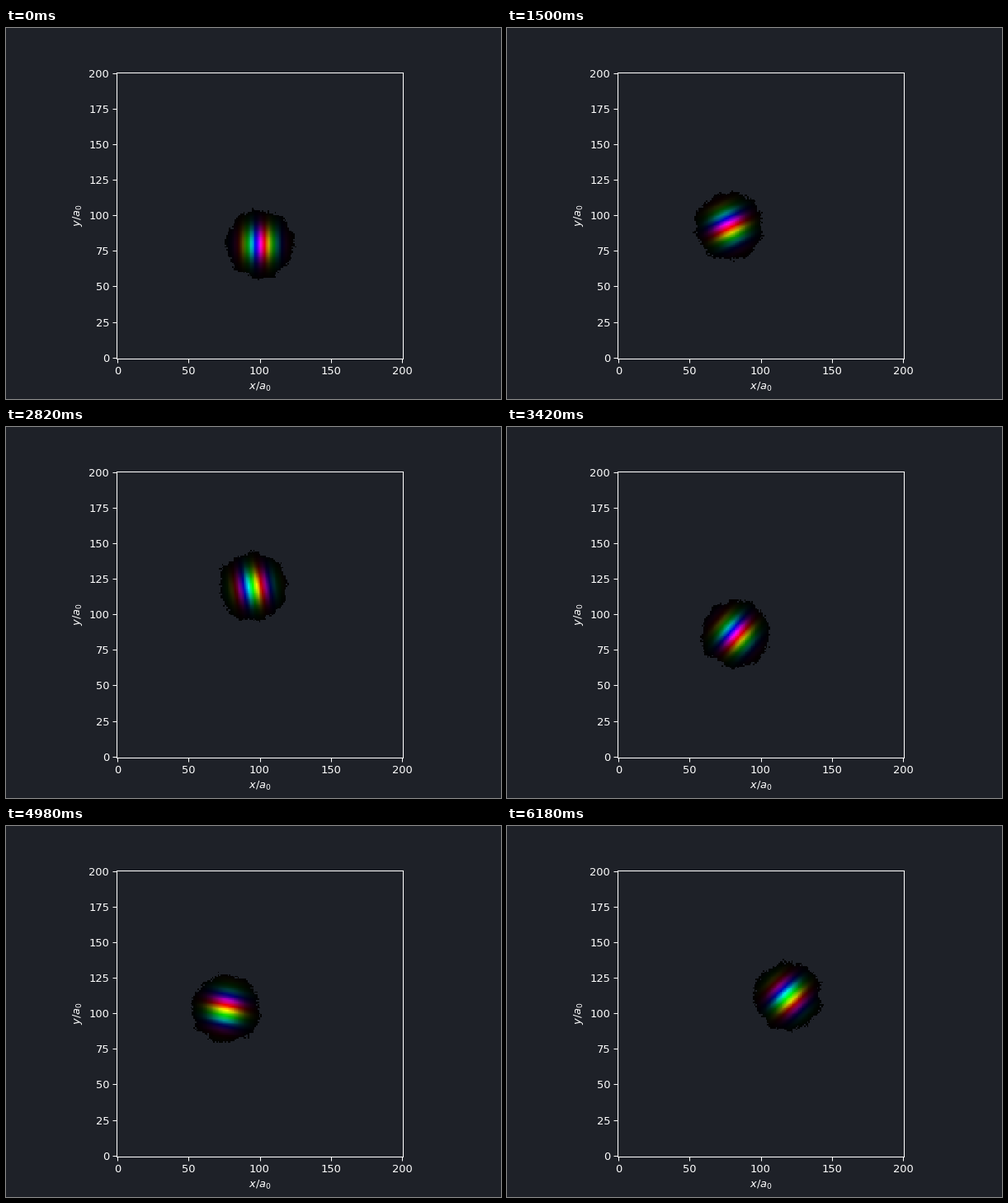
A matplotlib script that plays this animation: 600 by 450 pixels, repeating every 6240 ms.

```python
import numpy as np
import matplotlib.pyplot as plt
from matplotlib.animation import FuncAnimation
from matplotlib.colors import hsv_to_rgb

BG, FG = "#1e2128", "white"
SIZE = 200
LOOP, TICK = 6240, 30            # ms
STEP_MS, STATES = 41.25, 150     # the last state is held until the loop ends
OMEGA = 0.01 * np.sqrt(2)        # angular frequency, also mass * frequency
TURN = 10 * OMEGA                # oscillator phase per state
AX, AY = 24.0, 20.0              # orbit half-axes
WIDTH = 8.0
EDGE = 23.8                      # radius where the packet is cut off
PHASE0 = np.radians(291)

axis = np.arange(SIZE + 1) - SIZE / 2
X, Y = np.meshgrid(axis, axis)


def cutoff(angle, rng):
    """Ragged rim of the visible packet."""
    rim = EDGE + rng.normal(0, 0.7, angle.shape)
    for k in range(3, 14):
        rim += 0.3 * np.cos(k * angle + rng.uniform(0, 2 * np.pi))
    return rim


def packet(step):
    """Coherent state of a 2D harmonic oscillator: hue = phase, value = |psi|."""
    th = TURN * step
    s, c = np.sin(th), np.cos(th)
    xc, yc = AX * s, -AY * c
    px, py = OMEGA * AX * c, OMEGA * AY * s
    dx, dy = X - xc, Y - yc
    r = np.hypot(dx, dy)
    phase = px * X + py * Y - (px * xc + py * yc) / 2 - th + PHASE0
    hsv = np.stack([phase / (2 * np.pi) % 1,
                    np.ones_like(r),
                    np.exp(-(r / WIDTH)**2 / 2)], axis=-1)
    rim = cutoff(np.arctan2(dy, dx), np.random.default_rng(step))
    return np.dstack([hsv_to_rgb(hsv), r < rim])


fig, ax = plt.subplots(figsize=(6.4, 4.8), dpi=93.75, facecolor=BG)
ax.set_facecolor(BG)
image = ax.imshow(packet(0), origin="lower", interpolation="nearest")
ax.set_xticks(range(0, SIZE + 1, 50))
ax.set_yticks(range(0, SIZE + 1, 25))
ax.set_xlabel("$x/a_0$", color=FG)
ax.set_ylabel("$y/a_0$", color=FG)
ax.tick_params(colors=FG)
for spine in ax.spines.values():
    spine.set_color(FG)


def update(i):
    step = int(i * TICK / STEP_MS + 0.35)
    image.set_data(packet(min(step, STATES - 1)))
    return [image]


anim = FuncAnimation(fig, update, frames=LOOP // TICK, interval=TICK,
                     repeat=True, repeat_delay=0)
plt.show()
```
